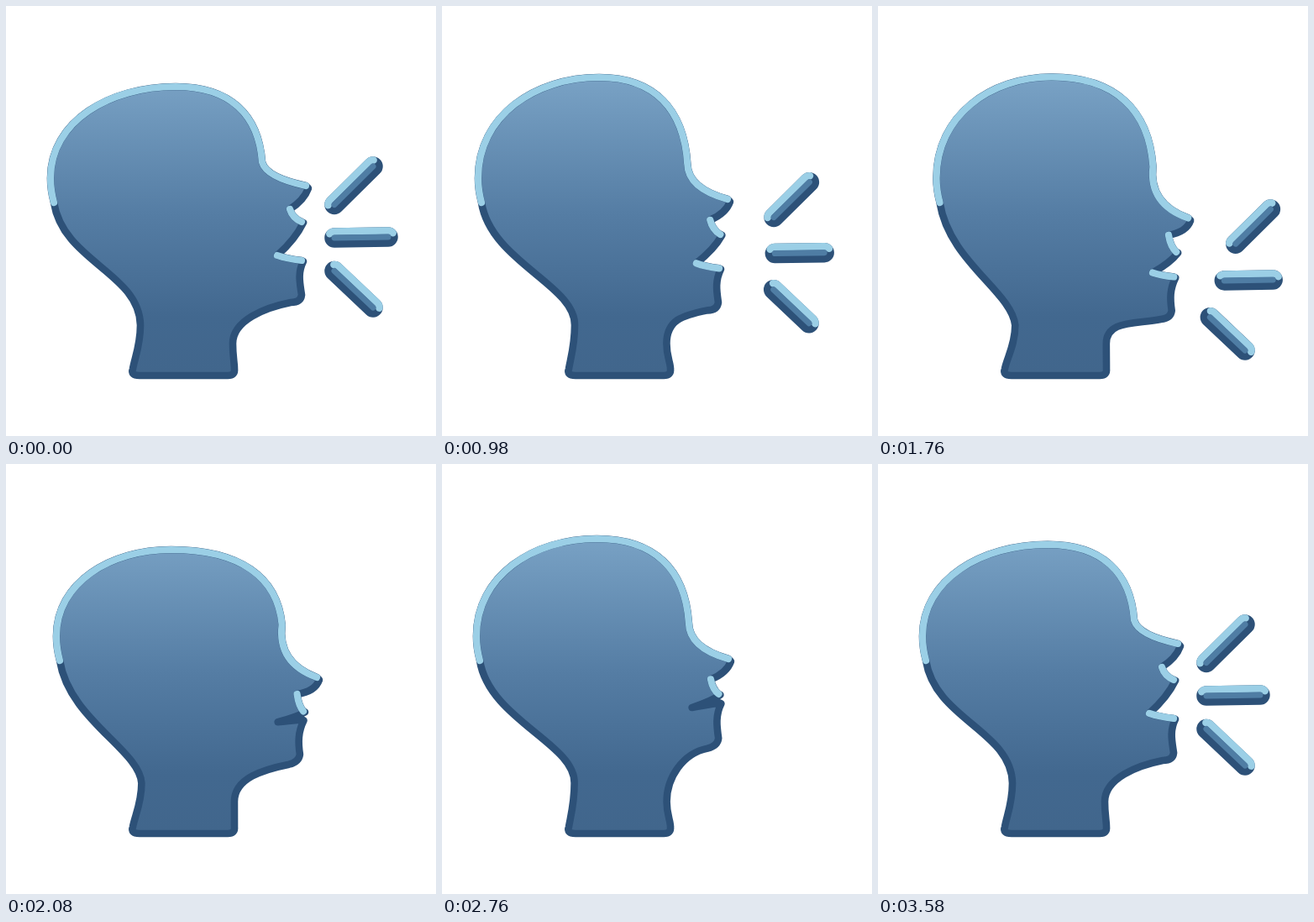
Recreate the animation shown at these times as an HTML page with a canvas. Size 512 by 512 pixels, loop 3600 ms.

```html
<!DOCTYPE html>
<html>
<head>
<meta charset="utf-8">
<style>
  html, body { margin: 0; width: 100%; height: 100%; overflow: hidden; background: #fff; }
  canvas { display: block; width: 512px; height: 512px; }
</style>
</head>
<body>
<canvas id="stage" width="512" height="512"></canvas>
<script>
const ctx = document.getElementById('stage').getContext('2d');
const LOOP = 3600, DARK = '#2d5178', LIGHT = '#9bcfe6', MID = '#4f7da4';

// time, back of head x, crown y, nose x, nose y, mouth opening
const KEYS = [
  [0, 53, 96, 360, 217, 1],
  [460, 57, 99, 367, 240, 0],
  [900, 40, 83, 341, 231, .9],
  [980, 43, 85, 343, 233, .85],
  [1460, 82, 88, 379, 262, .65],
  [1630, 72, 80, 372, 255, .7],
  [2080, 60, 102, 373, 257, 0],
  [2580, 44, 82, 350, 232, 0],
  [2760, 41, 89, 344, 235, 0],
  [2990, 27, 86, 330, 232, 0],
  [3250, 55, 82, 362, 207, 1]
];
KEYS.push([LOOP, ...KEYS[0].slice(1)]);

const BURSTS = [
  { appear: 3170, full: 3290, shrink: 3630, gone: 4060, drop: [0, 0], tilt: [0, 0] },
  { appear: 740, full: 870, shrink: 930, gone: 1560, drop: [18, 54], tilt: [0, 1.1] },
  { appear: 1640, full: 1710, shrink: 1740, gone: 1960, drop: [51, 51], tilt: [1.6, 1.6] }
];

const clamp = v => Math.max(0, Math.min(1, v));
const lerp = (a, b, k) => a + (b - a) * k;
const ramp = (t, a, b) => clamp((t - a) / (b - a));
const smooth = k => k * k * (3 - 2 * k);
const near = ([x, y], dx, dy) => [x + dx, y + dy];
const between = (a, b, kx, ky) => [lerp(a[0], b[0], kx), lerp(a[1], b[1], ky)];

const skin = ctx.createLinearGradient(0, 90, 0, 440);
[[0, '#78a1c4'], [.45, '#557da4'], [.8, '#42688f'], [1, '#41668c']]
  .forEach(([at, colour]) => skin.addColorStop(at, colour));

function stroke(path, width, colour) {
  ctx.lineWidth = width;
  ctx.strokeStyle = colour;
  ctx.stroke(path);
}

function poseAt(t) {
  const i = KEYS.findIndex(key => key[0] > t);
  const k = smooth(ramp(t, KEYS[i - 1][0], KEYS[i][0]));
  return KEYS[i].map((v, n) => lerp(KEYS[i - 1][n], v, k));
}

function drawHead(t) {
  const [, backX, top, noseX, noseY, open] = poseAt(t);
  const nod = (noseY - 217) / 45, shut = 1 - open;

  // the face hangs off the nose, the skull off the back of the head
  const nose = [noseX, noseY];
  const philtrum = near(nose, -22 - 5 * nod, 25 - 9 * nod);
  const lip = near(nose, -6 - 9 * nod - 3 * shut, 41 - 3 * nod);
  const corner = near(nose, -37 - 6 * nod - 7 * shut, 59 - 10 * nod + 21 * open);
  const lower = near(nose, -6 - 14 * nod, 52 - 4 * nod + 35 * open);
  const chin = near(nose, -8 - 17 * nod, 94 - 6 * nod + 33 * open);
  const under = near(chin, -13, 9 + 3 * shut);
  const bridge = near(nose, -50, -13 - 8 * nod);
  const brow = [noseX - 55 + 12 * nod, 186 + 6 * nod];
  const crown = [backX + 149 - 14 * nod, top];
  const side = [backX, 205], nape = [backX + 4, 234];
  const neck = 158 + (backX - 43) * .2, throat = 270 + (noseX - 360) * .15;
  const w = crown[0] - backX, h = 205 - top;
  const fw = brow[0] - crown[0], fh = brow[1] - top;

  const skull = `Q${near(side, 0, 14)} ${side}
    C${near(side, 0, -.62 * h)} ${near(crown, -.53 * w, 0)} ${crown}
    C${near(crown, .63 * fw, 0)} ${near(brow, -.04 * fw, -.63 * fh)} ${brow}
    Q${bridge} ${near(nose, -3, -3)}`;
  const upperLip = `Q${between(philtrum, lip, .2, .65)} ${near(lip, -2, -1)}`;
  const lowerLip = `Q${between(corner, lower, .35, .55)} ${near(lower, -2, -1)}`;

  const outline = new Path2D(`M${nape} ${skull} L${nose}
    Q${near(nose, -5, 14)} ${philtrum} ${upperLip} L${lip}
    Q${between(lip, corner, .3, .5)} ${corner} ${lowerLip} L${lower}
    C${near(lower, -7, 14)} ${near(chin, -2, -14)} ${chin}
    Q${near(chin, -1, 9)} ${under}
    C${near(under, -30, 6)} ${throat},374 ${throat},402
    C${throat},418 272,424 272,432 Q273,440 264,440
    L159,440 Q148,440 151,432 C153,420 ${neck},404 ${neck},380
    C159,${318 + 24 * Math.sqrt(clamp(nod))} ${near(nape, 11, 70)} ${nape}Z`);

  ctx.fillStyle = skin;
  ctx.fill(outline);
  stroke(outline, 8.6, DARK);
  stroke(new Path2D(`M${nape} ${skull}`), 8.2, LIGHT);
  stroke(new Path2D(`M${philtrum} ${upperLip}`), 8.2, LIGHT);
  ctx.globalAlpha = clamp((lower[1] - lip[1] - 14) / 10);
  stroke(new Path2D(`M${corner} ${lowerLip}`), 8.2, LIGHT);
  ctx.globalAlpha = 1;
}

function drawRay([x0, y0], [x1, y1], angle) {
  const core = new Path2D(`M${x0},${y0}L${x1},${y1}`);
  const shine = new Path2D();
  shine.arc(x0, y0, 7.5, angle - Math.PI + .7, angle - Math.PI / 2);
  shine.arc(x1, y1, 7.5, angle - Math.PI / 2, angle - .7);
  stroke(core, 23.5, DARK);
  stroke(shine, 8.5, LIGHT);
  stroke(core, 7, MID);
}

function drawBurst(time, { appear, full, shrink, gone, drop, tilt }) {
  const t = time < gone - LOOP + 10 ? time + LOOP : time;
  if (t < appear || t > gone + 10) return;
  const tip = ramp(t, appear, full), tail = ramp(t, shrink, gone);
  const k = smooth(tail), down = lerp(...drop, k), lean = lerp(...tilt, k);
  for (const side of [-1, 0, 1]) {
    const inner = [391, 276 + 39.5 * side];
    const outer = [455 - 18 * Math.abs(side), 275 + 84 * side];
    const shift = lean * 9.5 * (1 - side);
    const at = f => near(between(inner, outer, f, f), shift, down);
    drawRay(at(tail), at(Math.max(tip, tail + .001)), side * Math.PI / 4 + lean * .1);
  }
}

function draw(now) {
  const t = now % LOOP;
  ctx.clearRect(0, 0, 512, 512);
  ctx.lineCap = ctx.lineJoin = 'round';
  drawHead(t);
  BURSTS.forEach(burst => drawBurst(t, burst));
}

const start = performance.now();
function tick() {
  draw(performance.now() - start);
  requestAnimationFrame(tick);
}
tick();
</script>
</body>
</html>
```
